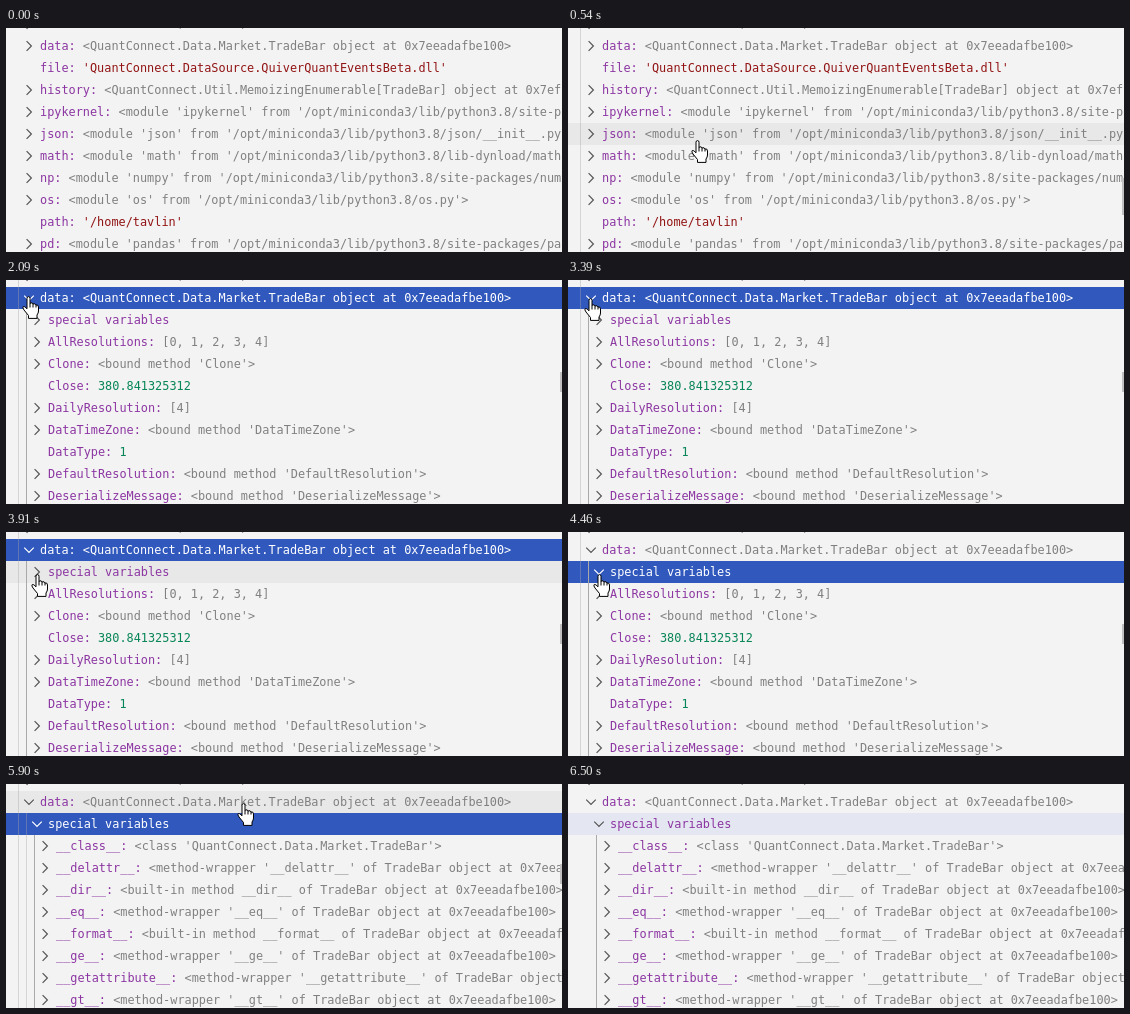
An HTML page for the animation above (6.53 s loop, 556x224 px).

```html
<!DOCTYPE html>
<html lang="en">
<head>
<meta charset="utf-8">
<title>Variable explorer</title>
<style>
  html, body { margin: 0; width: 100%; height: 100%; overflow: hidden; background: #f3f3f3; }
  #stage { position: relative; width: 556px; height: 224px; overflow: hidden; background: #f3f3f3;
    font: 11.87px/22px "DejaVu Sans Mono", "Noto Sans Mono", monospace; }
  .row { position: absolute; left: 0; width: 100%; height: 22px; white-space: pre; color: #808080; }
  .row.hover { background: #e8e8e8; }
  .row.soft { background: #e4e6f1; }
  .row.sel { background: #3058bd; }
  .text { position: absolute; top: 0; }
  .name { color: #8c36a2; }
  .str { color: #921414; }
  .num { color: #098658; }
  .row.sel span { color: #fff; }
  .row svg { position: absolute; top: 5px; width: 12px; height: 12px; fill: none; stroke: #555; stroke-width: 1.2; }
  .row.sel svg { stroke: #fff; }
  .row.open svg { transform: rotate(90deg); }
  .guide { position: absolute; width: 1px; bottom: 0; background: #a9a9a9; }
  #bar { position: absolute; left: 554px; width: 2px; background: #c2bfc0; }
  #hand { position: absolute; left: 0; top: 0; width: 18px; height: 24px; overflow: visible; }
</style>
</head>
<body>
<div id="stage"></div>
<script>
const LOOP = 6530, ROW = 22, TOP = 7;
const stage = document.getElementById('stage');
const lib = "/opt/miniconda3/lib/python3.8/";
const bar = 'TradeBar object at 0x7eeadafbe100>';
const mod = (name, path, file) => `>${name}: <module '${path}' from '${lib}${file}'>`;
const bound = name => `>${name}: <bound method '${name}'>`;
const wrap = name => `>__${name}__: <method-wrapper '__${name}__' of ${bar}`;
const built = name => `>__${name}__: <built-in method __${name}__ of ${bar}`;

// Each entry: depth, then the line; a leading ">" means the row can expand.
const clr = [0, ">clr: <module 'clr' (built-in)>"];
const data = [0, '>data: <QuantConnect.Data.Market.' + bar];
const special = [1, '>special variables'];
const at = (depth, lines) => lines.map(s => [depth, s]);

const lists = [
  [clr, data, ...at(0, [
    " file: 'QuantConnect.DataSource.QuiverQuantEventsBeta.dll'",
    '>history: <QuantConnect.Util.MemoizingEnumerable[TradeBar] object at 0x7ef3a1c05d80>',
    mod('ipykernel', 'ipykernel', 'site-packages/ipykernel/__init__.py'),
    mod('json', 'json', 'json/__init__.py'),
    mod('math', 'math', 'lib-dynload/math.so'),
    mod('np', 'numpy', 'site-packages/numpy/__init__.py'),
    mod('os', 'os', 'os.py'),
    " path: '/home/tavlin'",
    mod('pd', 'pandas', 'site-packages/pandas/__init__.py')])],
  [clr, data, special, ...at(1, [
    '>AllResolutions: [0, 1, 2, 3, 4]',
    bound('Clone'),
    ' Close: 380.841325312',
    '>DailyResolution: [4]',
    bound('DataTimeZone'),
    ' DataType: 1',
    bound('DefaultResolution'),
    bound('DeserializeMessage')])],
  [clr, data, special, ...at(2, [
    ">__class__: <class 'QuantConnect.Data.Market.TradeBar'>",
    wrap('delattr'), built('dir'), wrap('eq'), built('format'),
    wrap('ge'), wrap('getattribute'), wrap('gt')])]
];

function add(parent, tag, cls, text) {
  const el = document.createElement(tag);
  if (cls) el.className = cls;
  if (text) el.textContent = text;
  return parent.appendChild(el);
}

function makeRow(parent, [depth, line], i) {
  const row = add(parent, 'div', 'row');
  row.style.top = TOP + (i - 1) * ROW + 'px';
  if (line[0] === '>') {
    row.innerHTML = '<svg viewBox="0 0 12 12"><path d="M3.6 1.2 8.4 6 3.6 10.8"/></svg>';
    row.firstChild.style.left = 17 + depth * 8 + 'px';
  }
  const text = add(row, 'span', 'text');
  text.style.left = 34 + depth * 8 + 'px';
  const cut = line.indexOf(': ');
  add(text, 'span', 'name', cut < 0 ? line.slice(1) : line.slice(1, cut + 2));
  if (cut > 0) {
    const value = line.slice(cut + 2);
    add(text, 'span', value[0] === "'" ? 'str' : /^\d/.test(value) ? 'num' : '', value);
  }
  return row;
}

const views = lists.map(lines => {
  const box = add(stage, 'div');
  return { box, rows: lines.map((line, i) => makeRow(box, line, i)) };
});

const guides = [[12, 0], [20, 29], [28, 51]].map(([x, y]) => {
  const g = add(stage, 'div', 'guide');
  g.style.left = x + 'px';
  g.style.top = y + 'px';
  return g;
});

const thumb = add(stage, 'div');
thumb.id = 'bar';

stage.insertAdjacentHTML('beforeend', `<svg id="hand" viewBox="0 0 18 24" fill="#fff" stroke="#000" stroke-linejoin="round">
  <path d="M5 2.2Q5 .6 6.5 .6T8 2.2V7.2Q10.8 6 11 8Q13.6 7 14 9Q16.5 8.4 16.5 11V15Q16.5 17 15 19V22.4H6.5V19.5L2 14Q.2 11.5 1.2 10.6Q2.6 9.8 5 12.8Z"/>
  <path fill="none" d="M8 7v4.5M11 8v3.5M14 9v2.5"/></svg>`);
const hand = document.getElementById('hand');

// Pointer path: time, fingertip x, fingertip y.
const path = [
  [270, 300, 226], [420, 200, 160], [600, 95, 88], [760, 42, 46], [900, 28, 30],
  [940, 28, 30], [980, 25, 25], [1060, 23, 15], [1150, 22, 16],
  [3389, 22, 16], [3390, 22, 18], [3520, 23, 21], [3750, 29, 37], [3910, 31, 42],
  [5640, 31, 42], [5800, 110, 30], [5950, 300, 14], [6130, 570, 4]
];

function pointer(t) {
  const i = path.findIndex(p => p[0] > t);
  if (i < 1) return null;
  const [a, b] = [path[i - 1], path[i]];
  const k = (t - a[0]) / (b[0] - a[0]);
  return [a[1] + (b[1] - a[1]) * k, a[2] + (b[2] - a[2]) * k];
}

const ramp = (t, from, ms) => Math.max(0, Math.min(1, (t - from) / ms));

function draw(t) {
  const step = t < 1960 ? 0 : t < 4590 ? 1 : 2;
  const picked = t < 1830 ? -1 : t < 4330 ? 1 : 2;
  const tip = pointer(t);
  const over = tip ? Math.floor((tip[1] - TOP) / ROW) + 1 : -1;

  views.forEach((v, i) => v.box.style.display = i === step ? '' : 'none');
  views[step].rows.forEach((row, i) => {
    const open = i === 1 && t >= 1890 || i === 2 && t >= 4390;
    const tone = i === picked ? (t < 6500 ? ' sel' : ' soft') : i === over ? ' hover' : '';
    row.className = 'row' + (open ? ' open' : '') + tone;
  });

  const shown = ramp(t, 270, 100) * (1 - ramp(t, 6050, 100));
  guides.forEach((g, i) => {
    g.style.opacity = i > step ? 0 : i === step && i > 0 ? 1 : 0.4 * shown;
  });

  const [y, h] = [[150, 37], [92, 20], [80, 20]][step];
  thumb.style.top = y + 'px';
  thumb.style.height = h + 'px';
  thumb.style.opacity = t >= 6500 ? 0 : t >= 6370 ? 0.5 : ramp(t, 270, 100);

  hand.style.display = tip ? '' : 'none';
  if (tip) hand.style.transform = `translate(${Math.round(tip[0] - 6.5)}px, ${Math.round(tip[1])}px)`;
}

const start = performance.now();
function tick() {
  draw((performance.now() - start) % LOOP);
  requestAnimationFrame(tick);
}
tick();
</script>
</body>
</html>
```
